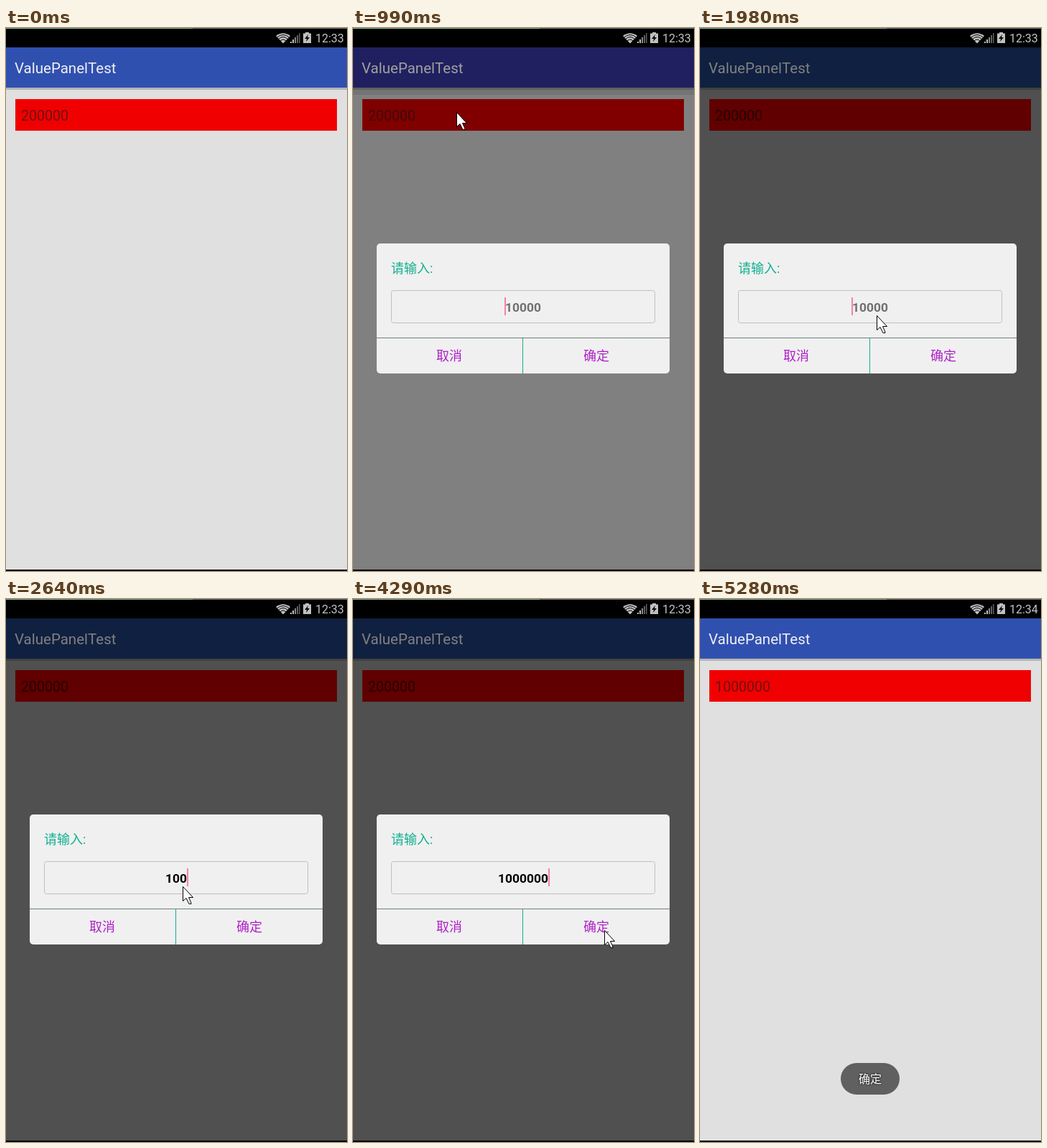
Recreate the animation shown at these times as an HTML page. Size 475 by 756 pixels, loop 6600 ms.

```html
<!DOCTYPE html>
<html lang="zh-CN">
<head>
<meta charset="utf-8">
<title>Input dialog</title>
<style>
  html, body { margin: 0; width: 100%; height: 100%; overflow: hidden; background: #000; }
  svg { display: block; width: 475px; height: 756px; }
  text { font-family: Roboto, "Noto Sans CJK SC", "Noto Sans CJK", sans-serif; }
  .mid { text-anchor: middle; }
  .bg { fill: var(--bg); }
  .bar { fill: var(--bar); }
  .edge { fill: var(--edge); }
  .strip { fill: var(--strip); }
  .box { fill: var(--box); }
  #value { fill: var(--value); font-size: 19.6px; }
  #title { fill: var(--title); font-size: 20.5px; }
  #clock { fill: #c4c4c4; font-size: 16px; }
  #entry { font-size: 17.4px; font-weight: 700; }
  .label { fill: #10b090; font-size: 18px; }
  .button { fill: #b020c8; font-size: 18px; }
  #toast text { font-size: 16px; }
</style>
</head>
<body>
<svg viewBox="0 0 475 756">
  <rect width="475" height="756"/>
  <rect width="260" height="1" fill="#86b494"/>
  <rect x="260" width="215" height="1" fill="#707070"/>

  <g fill="#c0c0c0">
    <path d="M376 11Q386 3.5 396 11L386 21.5Z"/>
    <g fill="none" stroke="#000" stroke-width="1">
      <path d="M377.5 13Q386 6 394.500 13M379.500 15.500Q386 9.500 392.500 15.500M382 18Q386 14 390 18"/>
    </g>
    <path d="M396 19h2v2h-2zM399 16h2v5h-2z"/>
    <path d="M402 13h2v8h-2z" fill="#888"/>
    <path d="M405 10h2v11h-2zM408 7h1.500v14h-1.500z" fill="#606060"/>
    <path d="M417 6h5v1.500h3v13.500h-11v-13.500h3z"/>
    <path d="M421 9l-5 6h3l-1 4 5-6h-3z" fill="#000"/>
  </g>
  <text id="clock" x="431" y="20"></text>

  <rect class="bg" y="83" width="475" height="671"/>
  <rect class="strip" y="83" width="475" height="10"/>
  <rect class="edge" y="83" width="475" height="3"/>
  <rect class="bar" y="27" width="475" height="56"/>
  <text id="title" x="12" y="63">ValuePanelTest</text>
  <rect class="box" x="13" y="99" width="448" height="44"/>
  <text id="value" x="21" y="129"></text>

  <g id="dialog">
    <rect x="33" y="300" width="408" height="181" rx="5" fill="#f0f0f0"/>
    <text class="label" x="53" y="340.500">请输入:</text>
    <rect x="53.500" y="365.500" width="367" height="45" rx="3" fill="none" stroke="#c0c0c0"/>
    <text id="entry" class="mid" x="237" y="395"></text>
    <rect id="caret" y="375" width="2" height="25" fill="#f880a8"/>
    <rect x="33" y="431" width="408" height="1" fill="#70807c"/>
    <rect x="236" y="432" width="1" height="49" fill="#10b090"/>
    <text class="button mid" x="134" y="463">取消</text>
    <text class="button mid" x="339" y="463">确定</text>
  </g>

  <g id="toast">
    <rect x="196" y="646" width="82" height="44" rx="22"/>
    <text class="mid" x="237" y="674">确定</text>
  </g>

  <path id="pointer" d="M.5.5V20.500L5 16.500 9 24.500H12L11.500 22 8.500 15.500H14.500Z" fill="#fff" stroke="#000"/>
</svg>
<script>
const STEP = 330, LOOP = 6600, HINT = "10000";
const $ = id => document.getElementById(id);

const theme = (bg, bar, edge, strip, box, value, title) => ({ bg, bar, edge, strip, box, value, title });
const bright = theme("#e0e0e0", "#3050b0", "#b4b4b4", "#e0e0e0", "#f00000", "#701010", "#f0f0f0");
const fading = theme("#e0e0e0", "#3040a0", "#b0b0b0", "#d0d0d0", "#f00000", "#601010", "#f0f0f0");
const half = theme("#808080", "#202060", "#606060", "#747474", "#800000", "#400808", "#a0a0a0");
const dark = theme("#505050", "#102040", "#404040", "#505050", "#600000", "#280000", "#808080");

// Each step overrides only what changes from the one before.
const changes = [
  { theme: bright, clock: "12:33", value: "200000", entry: "", caret: false, dialog: false, toast: 0, pointer: null },
  { pointer: [178, 111] },
  { pointer: [144, 117] },
  { theme: half, dialog: true, caret: true },
  { theme: dark, caret: false, pointer: [240, 391] },
  { pointer: [246, 400] },
  { caret: true },
  { entry: "1" },
  { entry: "100" },
  { entry: "100000" },
  { entry: "1000000" },
  { caret: false, pointer: [313, 441] },
  { pointer: [356, 475] },
  { caret: true, pointer: [350, 461] },
  { theme: fading, dialog: false, value: "1000000", toast: 1 },
  { theme: bright, toast: 2, pointer: [312, 469] },
  { clock: "12:34", pointer: null }
];
const states = [];
for (const change of changes) states.push({ ...states.at(-1), ...change });

const show = (id, on) => $(id).setAttribute("visibility", on ? "inherit" : "hidden");

function draw(s) {
  for (const key in s.theme) document.body.style.setProperty("--" + key, s.theme[key]);
  $("clock").textContent = s.clock;
  $("value").textContent = s.value;
  $("entry").textContent = s.entry || HINT;
  $("entry").setAttribute("fill", s.entry ? "#000" : "#707070");
  $("caret").setAttribute("x", s.entry ? 237 + 5 * s.entry.length : 211);
  show("dialog", s.dialog);
  show("caret", s.caret);
  show("toast", s.toast);
  const [pill, label] = $("toast").children;
  pill.setAttribute("fill", s.toast === 1 ? "#a0a0a0" : "#606060");
  label.setAttribute("fill", s.toast === 1 ? "#f0f0f0" : "#fff");
  label.style.textShadow = s.toast === 2 ? "0 0 3px #000" : "none";
  show("pointer", s.pointer);
  if (s.pointer) $("pointer").setAttribute("transform", `translate(${s.pointer})`);
}

const start = performance.now();
let shown = -1;
function tick() {
  const time = (performance.now() - start) % LOOP;
  const index = Math.min(Math.floor(time / STEP), states.length - 1);
  if (index !== shown) draw(states[shown = index]);
  requestAnimationFrame(tick);
}
tick();
</script>
</body>
</html>
```
